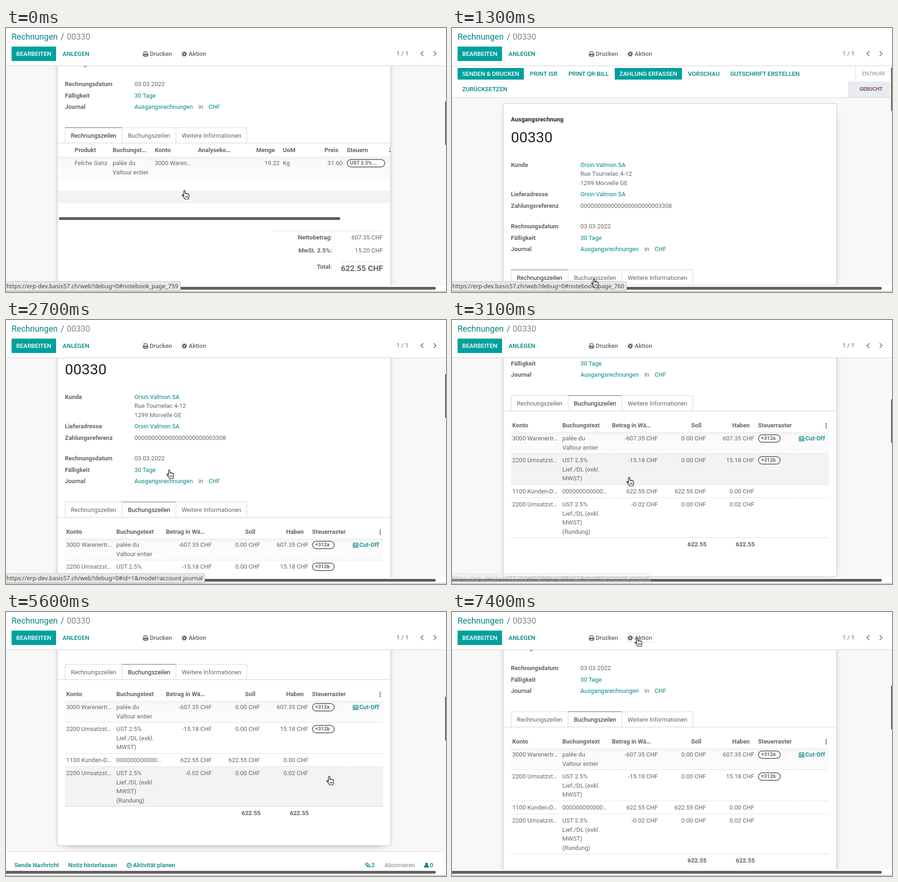
An HTML page for the animation above (8000 ms loop, 949 px wide and 568 px high).

```html
<!DOCTYPE html>
<html lang="de">
<head>
<meta charset="utf-8">
<title>Rechnung</title>
<style>
html, body { margin: 0; width: 100%; height: 100%; overflow: hidden; background: #fff; }
body, #stage { font: 13px/20px Roboto, sans-serif; color: #666; }
#stage { position: relative; width: 949px; height: 568px; overflow: hidden; }
#stage div, #stage span, #stage svg { position: absolute; box-sizing: border-box; }
#stage svg { overflow: visible; }
span { white-space: pre; }
.r { width: 300px; text-align: right; }
.b { font-weight: 700; }
.m { font-weight: 500; }
.k { color: #212529; }
.l { color: #008784; }
.w { color: #fff; }
.s { font-size: 11px; }
.h { font-size: 18px; }
.g { color: #888; }
.p { color: #7c4f72; }
#view { left: 0; top: 82px; width: 949px; height: 472px; overflow: hidden; background: #f8f8f8; }
#page { left: 0; width: 949px; height: 1100px; }
.card { background: #fff; border: 1px solid #c8c8d3; box-shadow: 0 5px 20px -15px #000; }
.pill { border: 2px solid #777; border-radius: 9px; background: #fff; }
.first { background: linear-gradient(#f0f0f0, #fafafa 9px, #fbfbfb); }
.tab { border: 1px solid #d5d5dc; border-bottom: 0; }
.tab.on { border-top-color: #7c4f72; background: #fff; }
#status { left: 0; top: 545px; height: 21px; padding: 0 4px 0 1px; white-space: pre; background: #e7e7e7;
  border: 1px solid #c4c4c4; border-left: 0; border-radius: 0 3px 0 0;
  font: 12.7px/19px "Noto Sans", sans-serif; color: #444; }
</style>
</head>
<body>
<div id="stage"></div>
<script>
const TEAL = '#00a09d', LINE = '#dcdcdc', DARK = '#5e5e5e';

// Text with its capitals centred on y; class r makes x the right edge.
const text = (x, y, str, cls = '') => {
  const right = cls.split(' ').includes('r');
  return `<span class="${cls}" style="left:${right ? x - 300 : x}px;top:${y - 10}px">${str}</span>`;
};
const box = (x, y, w, h, bg = 'none', attrs = '', inner = '') =>
  `<div ${attrs} style="left:${x}px;top:${y}px;width:${w}px;height:${h}px;background:${bg}">${inner}</div>`;
const shape = (x, y, w, h, attrs) =>
  `<div ${attrs} style="left:${x}px;top:${y}px;width:${w}px;height:${h}px"></div>`;
const icon = (x, y, color, inner) =>
  `<svg width="12" height="12" style="left:${x}px;top:${y}px" fill="none" stroke="${color}" stroke-width="1.4">${inner}</svg>`;
const button = (x, y, w, h, str) => box(x, y, w, h, TEAL) + text(x + 10, y + h / 2, str, 'm w');
const pill = (x, y, w, str) => shape(x, y, w, 18, 'class="pill"') + text(x + 7, y + 9, str, 's b');

const gear = '<circle cx="5.5" cy="6" r="3" stroke-width="2.6"/><circle cx="5.5" cy="6" r="4.8" stroke-width="1.8" stroke-dasharray="1.9 1.87"/>';
const printer = '<path d="M2.5 5.5V1h5.5l1.5 1.5v3M2.5 9H.7V6.2h10.6V9H9.5M2.7 8h6.6v3.3H2.7z"/>';
const clock = '<circle cx="5.5" cy="6" r="4.6" stroke-width="1.6"/><path d="M6 3v3.5H3.5"/>';
const clip = '<path d="M3 4l5 5c1.6 1.4 3.6-.4 2.2-2L5 1.8C2.6-.2-.6 2.800 1.400 5.200l4.800 4.800"/>';
const user = '<g stroke="none" fill="#008784"><circle cx="5" cy="3.400" r="2.800"/><path d="M0 11V9q0-3 2.500-3.300h5Q10 6 10 9v2z"/></g>';
const calendar = '<path d="M.7 2.500h10.600v9H.7zM.7 5.500h10.600M.7 8.500h10.600M4.200 5v6M7.800 5v6M3.300 0v3.500M8.700 0v3.500" stroke-width="1.200"/>';

const header =
  text(12, 19, 'Rechnungen', 'h l') + text(118, 19, '/', 'h') + text(131, 19, '00330', 'h g') +
  button(12, 40, 96, 31, 'BEARBEITEN') + text(122, 56, 'ANLEGEN', 'm l') +
  icon(295, 50, DARK, printer) + text(310, 56, 'Drucken', 'm') +
  shape(378, 45, 58, 21, 'id="action"') + icon(379, 50, DARK, gear) + text(394, 56, 'Aktion', 'm') +
  text(842, 55, '1 / 1') +
  icon(891, 49, '#888', '<path d="M9 1L4 6l5 5" stroke-width="2"/>') +
  icon(919, 49, '#888', '<path d="M3.500 1l5 5-5 5" stroke-width="2"/>') +
  box(0, 81, 949, 1, '#cfcfcf');

const statusBar =
  box(0, 82, 944, 68, '#fff') + box(0, 149, 944, 1, '#d4d4d8') +
  button(12, 86, 143, 25, 'SENDEN &amp; DRUCKEN') + button(351, 86, 145, 25, 'ZAHLUNG ERFASSEN') +
  [[168, 'PRINT ISR'], [251, 'PRINT QR-BILL'], [509, 'VORSCHAU'], [600, 'GUTSCHRIFT ERSTELLEN']]
    .map(([x, s]) => text(x, 98.5, s, 'm l')).join('') +
  text(22, 132, 'ZURÜCKSETZEN', 'm l') +
  box(869, 82, 1, 33, LINE) + text(885, 98.5, 'ENTWURF', 's g') +
  box(855, 115, 89, 34, '#e9ecef') + box(855, 115, 1, 34, LINE) + text(879, 132, 'GEBUCHT', 's b p');

const form =
  shape(110, 162, 720, 749, 'class="card"') +
  text(127, 197, 'Ausgangsrechnung', 'b k') +
  `<span class="k" style="left:127px;top:215px;font-size:32px;line-height:40px">00330</span>` +
  [['Kunde', 295], ['Lieferadresse', 358], ['Zahlungsreferenz', 383], ['Rechnungsdatum', 427],
   ['Fälligkeit', 452], ['Journal', 476]].map(([s, y]) => text(127, y, s, 'b')).join('') +
  text(277, 295, 'Orsin Valmon SA', 'l') + text(277, 314, 'Rue Tournelac 4-12') +
  text(277, 334, '1299 Morvelle GE') + text(277, 358, 'Orsin Valmon SA', 'l') +
  text(277, 383, '0'.repeat(23) + '3308') + text(277, 427, '03.03.2022') +
  text(277, 452, '30 Tage', 'l') + text(277, 476, 'Ausgangsrechnungen', 'l') +
  text(415, 476, 'in') + text(437, 476, 'CHF', 'l') +
  box(111, 553, 718, 1, '#d0d0d6') +
  [[127, 124, 'Rechnungszeilen'], [250, 117, 'Buchungszeilen'], [366, 154, 'Weitere Informationen']]
    .map(([x, w, s]) => shape(x, 520, w, 33, 'class="tab"') + text(x + 13, 538, s, 'label')).join('');

const lines =
  [[148, 'Produkt'], [230, 'Buchungst…'], [321, 'Konto'], [414, 'Analyseko…'], [597, 'UoM'], [735, 'Steuern']]
    .map(([x, s]) => text(x, 569, s, 'b')).join('') +
  text(580, 569, 'Menge', 'b r') + text(717, 569, 'Preis', 'b r') +
  `<div style="left:820px;top:556px;width:9px;height:26px;overflow:hidden">${text(6, 13, 'Z', 'b')}</div>` +
  shape(111, 583, 718, 46, 'class="first"') +
  shape(111, 656, 718, 27, 'class="row"') +
  text(148, 597, 'Felche Ganz') + text(230, 597, 'palée du') + text(230, 616.5, 'Valtour entier') +
  text(321, 597, '3000 Waren…') + text(590, 597, '19.22', 'r') + text(597, 597, 'Kg') +
  text(726, 597, '31.60', 'r') + pill(735, 588, 83, 'UST 2.5% …') +
  `<div style="left:114px;top:713px;width:607px;height:6px;border-radius:3px;background:${DARK}"></div>` +
  box(573, 742, 240, 1, LINE) + text(703, 757, 'Nettobetrag:', 'b r') + text(813, 757, '607.35 CHF', 'r') +
  text(703, 785, 'MwSt. 2.5%:', 'b r') + text(813, 785, '15.20 CHF', 'r') +
  box(723, 809, 90, 1, LINE) + text(703, 820, 'Total:', 'b r') +
  `<span class="b r" style="left:513px;top:813px;font-size:17px">622.55 CHF</span>`;

const entries = [
  [599, 46, '3000 Warenertr…', 'palée du|Valtour entier', '-607.35', '0.00', '607.35', '+312a'],
  [646, 66, '2200 Umsatzst…', 'UST 2.5%|Lief./DL (exkl.|MWST)', '-15.18', '0.00', '15.18', '+312b'],
  [713, 27, '1100 Kunden-D…', '000000000000…', '622.55', '622.55', '0.00'],
  [741, 85, '2200 Umsatzst…', 'UST 2.5%|Lief./DL (exkl.|MWST)|(Rundung)', '-0.02', '0.00', '0.02'],
];
const edges = [127, 234, 341, 448, 553, 657, 737, 814];
const bookings =
  text(130, 585, 'Konto', 'b') + text(238, 585, 'Buchungstext', 'b') + text(345, 585, 'Betrag in Wä…', 'b') +
  text(538, 585, 'Soll', 'b r') + text(642, 585, 'Haben', 'b r') + text(660, 585, 'Steuerraster', 'b') +
  [580, 584, 588].map(y => box(806, y, 2, 2.5, DARK)).join('') +
  entries.map(([y, h, account, label, amount, debit, credit, tag], i) =>
    (i ? '' : shape(127, y, 686, h, 'class="first"')) + shape(127, y, 686, h, 'class="row"') +
    text(130, y + 14, account) +
    label.split('|').map((s, n) => text(238, y + 14 + n * 19.5, s)).join('') +
    [[444, amount], [548, debit], [652, credit]].map(([x, s]) => text(x, y + 14, s + ' CHF', 'r')).join('') +
    (tag ? pill(660, y + 5, 49, tag) : '') +
    (i === 3 ? box(127, y + h, 686, 1, LINE)
      : edges.slice(1).map((x, n) => box(edges[n], y + h, x - edges[n] - 1, 1, '#e4e4e4')).join(''))
  ).join('') +
  icon(748, 607, '#008784', calendar) + text(762, 613, 'Cut-Off', 'm l') +
  text(549, 841, '622.55', 'b r') + text(653, 841, '622.55', 'b r');

const chatter =
  box(0, 923, 944, 150, '#fff') + box(0, 923, 944, 1, LINE) +
  text(18, 953, 'Sende Nachricht', 'm l') + text(134, 953, 'Notiz hinterlassen', 'm l') +
  icon(260, 947, '#008784', clock) + text(274, 953, 'Aktivität planen', 'm l') +
  icon(775, 947, '#008784', clip) + text(788, 953, '2', 'm l') +
  text(816, 953, 'Abonnieren', 'g') + icon(902, 947, '#008784', user) + text(914, 953, '0', 'm l');

const $ = id => document.getElementById(id);
$('stage').innerHTML = header +
  `<div id="view"><div id="page">${statusBar}${form}<div id="lines">${lines}</div>` +
  `<div id="bookings">${bookings}</div>${chatter}</div></div>` +
  `<div id="thumb" style="left:947px;width:4px;border-radius:2px;background:${DARK}"></div>` +
  `<div style="left:-3px;top:557px;width:930px;height:6px;border-radius:3px;background:${DARK}"></div>` +
  box(0, 566, 949, 1, '#a8a8a8') + '<div id="status"></div>' +
  `<svg id="hand" width="17" height="20" fill="#fff" stroke="#111" stroke-width="1.200" stroke-linejoin="round">
    <path d="M4.500 12V2.200a1.500 1.500 0 0 1 3 0V7.500c0-1.200 2.600-1.200 2.800.3.3-1 2.500-.9 2.700.5.4-.8 2.500-.6 2.500 1.200V14c0 2.500-1 3-1 5H6.500c0-2-2-3-3-5L1 11c-.7-1.300 1-2.300 2-1.300z"/>
    <path d="M8 12v4M10.200 12v4M12.400 12v4" stroke-width=".9"/></svg>`;

const scrollPath = [[0, 306], [400, 0], [2200, 0], [2400, 102], [2600, 102], [3100, 358], [3300, 408], [6600, 408], [6900, 306]];
const handPath = [
  [0, 387, 359], [400, 387, 357], [500, 387, 357], [900, 312, 546], [1400, 308, 549], [1800, 308, 540],
  [2200, 307, 323], [2400, 307, 323], [2600, 350, 330], [3100, 384, 348], [3400, 512, 410], [3900, 714, 385],
  [4300, 512, 375], [4800, 696, 354], [5000, 696, 354], [5300, 693, 370], [5600, 699, 363], [5800, 798, 377],
  [5900, 798, 377], [6100, 837, 368], [6500, 837, 368], [6900, 790, 330], [7400, 402, 65]];
const base = 'https://erp-dev.basis57.ch/web?debug=0#';
const hints = [
  ['notebook_page_759', -1, 100, 250], ['notebook_page_760', 800, 1900, 2100],
  ['id=1&model=account.journal', 2600, 3000, 3155]];

function along(path, t) {
  const n = path.findIndex(p => p[0] > t);
  if (n < 0) return path[path.length - 1].slice(1);
  const a = path[n - 1], b = path[n], u = (t - a[0]) / (b[0] - a[0]), e = u * u * (3 - 2 * u);
  return a.slice(1).map((v, i) => v + (b[i + 1] - v) * e);
}

const tabs = document.querySelectorAll('.tab'), labels = document.querySelectorAll('.label');
const rows = document.querySelectorAll('.row');

function draw(t) {
  const scroll = Math.round(along(scrollPath, t)[0]);
  const [x, y] = along(handPath, t).map(Math.round);
  const active = t < 1400 ? 0 : 1;
  $('page').style.top = -82 - scroll + 'px';
  $('lines').style.display = active ? 'none' : '';
  $('bookings').style.display = active ? '' : 'none';
  tabs.forEach((tab, i) => tab.classList.toggle('on', i === active));
  labels.forEach((label, i) => label.classList.toggle('k', i === active));

  const tip = y - 8;
  rows.forEach(row => {
    const top = parseFloat(row.style.top) - scroll;
    const over = tip > 82 && tip < 554 && x < 840 && tip >= top && tip < top + parseFloat(row.style.height);
    row.style.background = over ? '#f3f3f3' : 'none';
  });
  $('action').style.border = x < 438 && tip < 66 ? '1px solid #ddd' : '';
  $('hand').style.left = x - 8 + 'px';
  $('hand').style.top = y - 10 + 'px';
  $('thumb').style.top = 85 + scroll * 0.238 + 'px';
  $('thumb').style.height = 94 + active + 'px';

  const hint = hints.find(h => t >= h[1] && t < h[3]);
  $('status').style.opacity = hint ? Math.min(1, (hint[3] - t) / (hint[3] - hint[2])) : 0;
  if (hint) $('status').textContent = base + hint[0];
}

function loop(now) {
  draw(Math.floor((now % 8000) / 100) * 100);
  requestAnimationFrame(loop);
}
draw(0);
requestAnimationFrame(loop);
</script>
</body>
</html>
```
